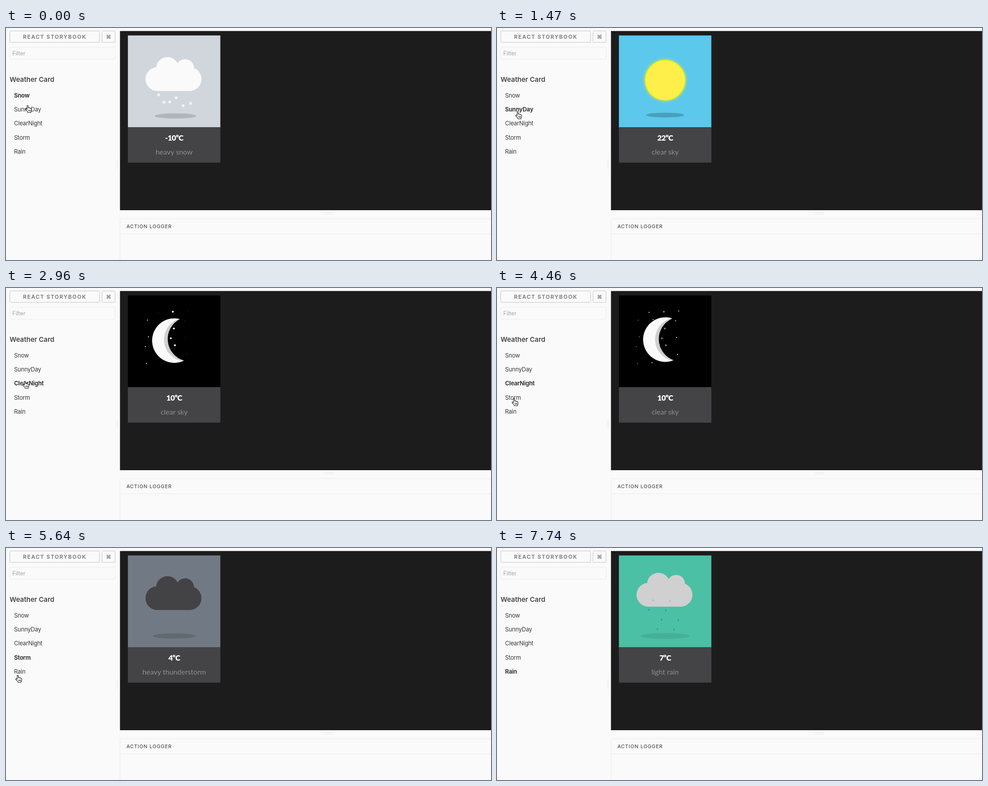
Recreate the animation shown at these times as an HTML page. Size 1083 px wide and 517 px high, loop 7.84 s.

```html
<!DOCTYPE html>
<html lang="en">
<head>
<meta charset="utf-8">
<title>Weather cards</title>
<style>
  html, body { margin: 0; width: 100%; height: 100%; overflow: hidden; background: #fafafa; }
  svg { display: block; width: 100%; height: 100%; }
  text { font-family: Inter, "Open Sans", sans-serif; fill: #444; }
  .mid { text-anchor: middle; }
  .box { fill: none; stroke: #c1c1c1; }
  .rule { fill: none; stroke: #ebebeb; }
  .button { font-size: 12px; font-weight: 700; fill: #828282; }
  .title { font-size: 15px; font-weight: 600; }
  .item { font-size: 13px; letter-spacing: -.25px; fill: #383838; }
  .item.on { font-weight: 700; }
  .temp { font: 900 17px Lato, sans-serif; letter-spacing: -.7px; fill: #fff; }
  .note { font: 16px Lato, sans-serif; fill: #8f8f91; }
</style>
</head>
<body>
<svg viewBox="0 0 1083 517">
  <defs>
    <g id="cloud">
      <rect x="311.5" y="22.5" width="125" height="53" rx="26.5"/>
      <circle cx="360.5" cy="25.5" r="25.5"/>
      <circle cx="400" cy="24.5" r="19.8"/>
      <rect x="345" y="20" width="68" height="30"/>
    </g>
    <path id="drop" d="M0-3.5Q1.5-.8 1.5.8A1.5 1.7 0 0 1-1.5.8Q-1.5-.8 0-3.5Z"/>
    <filter id="glow" x="-30%" y="-30%" width="160%" height="160%">
      <feGaussianBlur stdDeviation="3.5"/>
    </filter>
  </defs>

  <rect width="1083" height="517" fill="#fafafa"/>
  <rect class="box" x="8.5" y="6.5" width="200.5" height="25.5" rx="2"/>
  <rect class="box" x="214.5" y="6.5" width="29" height="25.5" rx="2"/>
  <text class="button mid" x="109" y="23.5" letter-spacing="1.5">REACT STORYBOOK</text>
  <text class="button mid" x="229" y="23.5">⌘</text>
  <rect class="rule" x="8.5" y="42.5" width="235" height="27" rx="2"/>
  <text x="14" y="61" font-size="12.5" style="fill:#a4a4a4">Filter</text>
  <text class="title" x="8" y="120">Weather Card</text>
  <g id="menu"></g>
  <path class="rule" d="M246.5 293v21M249.5 293v21M710 411.5h21M710 414.5h21"/>

  <rect x="254.5" y="6.7" width="829" height="399.3" fill="#1c1c1c"/>
  <path class="rule" d="M254.5 517V428q0-3 3-3H1083M254.5 458.5H1083"/>
  <text x="269" y="446" font-size="11" letter-spacing=".9" style="fill:#333">ACTION LOGGER</text>

  <rect id="sky" x="272.2" y="16.6" width="206.4" height="205"/>
  <rect x="272.2" y="221" width="206.4" height="79" fill="#444446"/>
  <text id="temp" class="temp mid" x="375.5" y="251"></text>
  <text id="note" class="note mid" x="375.5" y="282"></text>
  <ellipse id="shadow"/>

  <use id="puff" href="#cloud"/>
  <g id="sun">
    <circle r="45" fill="#f4f032" filter="url(#glow)"/>
    <circle r="44" fill="#ffef4a" stroke="#f8f20c" stroke-width="2"/>
  </g>
  <g id="night">
    <g id="starsA" fill="#fff"></g>
    <g id="starsB" fill="#fff"></g>
    <g id="moon">
      <path d="M16-47A49.5 49.5 0 1 0 19 46A50 50 0 0 1 16-47Z" fill="#cfcfcf"/>
      <path d="M14-47.5A49.5 49.5 0 1 0 16 47A48.5 48.5 0 0 1 14-47.5Z" fill="#fafafa"/>
    </g>
  </g>
  <g id="flakes" fill="#fafafa" opacity=".8"></g>
  <g id="drops" fill="#2f8fc0"></g>

  <path id="hand" fill="#fff" stroke="#111" stroke-width="1.1" stroke-linejoin="round"
    d="M4 9.5V2Q4 .6 5.2.6T6.500 2V6Q8.500 5 9.300 6.600Q11 5.900 11.600 7.300Q13.800 6.700 13.900 8.800V11.500Q13.800 13.500 12.600 14.500V16.500H5.800Q5.500 14.800 4 13.200L1 9.800Q.2 8.600 1.300 8Q2.300 7.500 4 9.500ZM7.300 10.500v3M9.300 10.500v3M11.300 10.500v3"/>
  <path id="arrow" d="M.5.5V14.500L3.800 11.400L6.300 17L8.700 16L6.300 10.500H10.500Z" fill="#111" stroke="#fff" stroke-width=".8"/>
</svg>
<script>
const LOOP = 7840, STEP = 148.4, LAST = 52, GLIDE = 600;
const $ = id => document.getElementById(id);

function set(node, attrs) {
  for (const key in attrs) node.setAttribute(key, attrs[key]);
}
function add(parent, tag, attrs, text = "") {
  const node = document.createElementNS("http://www.w3.org/2000/svg", tag);
  set(node, attrs);
  node.textContent = text;
  return $(parent).appendChild(node);
}
const show = (id, on) => $(id).style.display = on ? "" : "none";
const repeat = (length, make) => Array.from({ length }, (_, i) => make(i));
const wave = x => .5 - .5 * Math.cos(Math.PI * x);
const wrap = (v, n) => ((v % n) + n) % n;
const clamp = v => Math.max(0, Math.min(1, v));

// start: when the card is mounted; half: time of one rise
const scenes = [
  { name: "Snow", start: -750, half: 1800, sky: "#d1d6dd", cloud: "#fafafa", temp: "-10ºC", note: "heavy snow" },
  { name: "SunnyDay", start: 590, half: 1760, sky: "#5bc8ec", temp: "22ºC", note: "clear sky" },
  { name: "ClearNight", start: 2670, half: 1800, sky: "#000", temp: "10ºC", note: "clear sky" },
  { name: "Storm", start: 4598, half: 2100, sky: "#717a84", cloud: "#434345", temp: "4ºC", note: "heavy thunderstorm" },
  { name: "Rain", start: 6230, half: 1640, sky: "#4bc0a5", cloud: "#d0d0d0", temp: "7ºC", note: "light rain" }
];
const items = scenes.map((s, i) =>
  add("menu", "text", { class: "item", x: 18, y: 154.5 + 31.4 * i }, s.name));

// evenly scattered stars in two groups; the moon covers some of them
repeat(18, i => add(i % 2 ? "starsB" : "starsA", "circle", {
  cx: 310 + 116 * wrap(.5 + i * .7549, 1),
  cy: 45 + 134 * wrap(.5 + i * .5698, 1),
  r: i % 4 ? 1.1 : 2.1
}));

const flakes = repeat(6, i => ({
  phase: 23 + 2 * i - 9 * Math.cos(2.2 * i),
  node: add("flakes", "circle", { cx: 341 + 11 * i + .65 * i * i, r: 3.2 })
}));
const drops = repeat(8, i => ({
  phase: 78 - 21 * i,
  node: add("drops", "use", { href: "#drop", x: 339.5 + 9.3 * i })
}));

// arrival time and place of each pointer rest
const stops = [[0, 43, 172], [1030, 41, 186], [2300, 37, 207],
  [3800, 33, 246], [5500, 21, 283], [6520, 769.5, 484.5]];

function pointer(t) {
  return stops.reduce(([x, y], [arrive, nextX, nextY]) => {
    const k = wave(clamp((t - arrive) / GLIDE + 1));
    return [x + (nextX - x) * k, y + (nextY - y) * k];
  }, stops[0].slice(1));
}

function draw(t) {
  const index = scenes.findLastIndex(s => t >= s.start);
  const scene = scenes[index];
  const lift = wave((t - scene.start) / scene.half);
  const sunny = index === 1, night = index === 2;

  items.forEach((node, i) => node.classList.toggle("on", i === index));
  set($("sky"), { fill: scene.sky });
  $("temp").textContent = scene.temp;
  $("note").textContent = scene.note;

  show("puff", scene.cloud);
  show("sun", sunny);
  show("night", night);
  show("flakes", index === 0);
  show("drops", index === 4);
  show("shadow", !night);
  set($("puff"), { fill: scene.cloud || "none", transform: `translate(0 ${70.5 - 15.5 * lift})` });
  set($("sun"), { transform: `translate(375.5 ${123.5 - 14 * lift})` });
  set($("moon"), { transform: `translate(375.5 ${117.3 - 2.4 * lift}) rotate(${-4.2 + 4.2 * lift})` });
  set($("shadow"), {
    cx: index === 0 ? 378.5 : 375.5,
    cy: sunny ? 194 : 196,
    rx: (sunny ? 35.8 : 41.3) + 13.6 * lift,
    ry: (sunny ? 4.3 : 5.2) + 1.7 * lift,
    opacity: (sunny ? .26 : .2) - .12 * lift
  });

  set($("starsA"), { opacity: .15 + .85 * wave((t - 1910) / 1050) });
  set($("starsB"), { opacity: .13 + .87 * wave((t - 2960) / 1500) });

  for (const { phase, node } of flakes) {
    const fall = wrap(phase + t * .035, 55);
    set(node, { cy: 135 + fall, opacity: clamp((55 - fall) / 10) });
  }
  for (const { phase, node } of drops) {
    const fall = wrap(phase + (t - 6675) * .113, 85);
    set(node, { y: 112 + fall, opacity: Math.min(clamp(.12 + fall / 32), clamp((92 - fall) / 25)) });
  }

  const [x, y] = pointer(t);
  const overMenu = x < 90;
  for (const id of ["hand", "arrow"]) set($(id), { transform: `translate(${x} ${y})` });
  show("hand", overMenu);
  show("arrow", !overMenu && t < 6800);
}

const origin = performance.now();
function tick() {
  const time = Math.max(0, performance.now() - origin) % LOOP;
  draw(Math.min(LAST, Math.floor(time / STEP + .1)) * STEP);
  requestAnimationFrame(tick);
}
tick();
</script>
</body>
</html>
```
